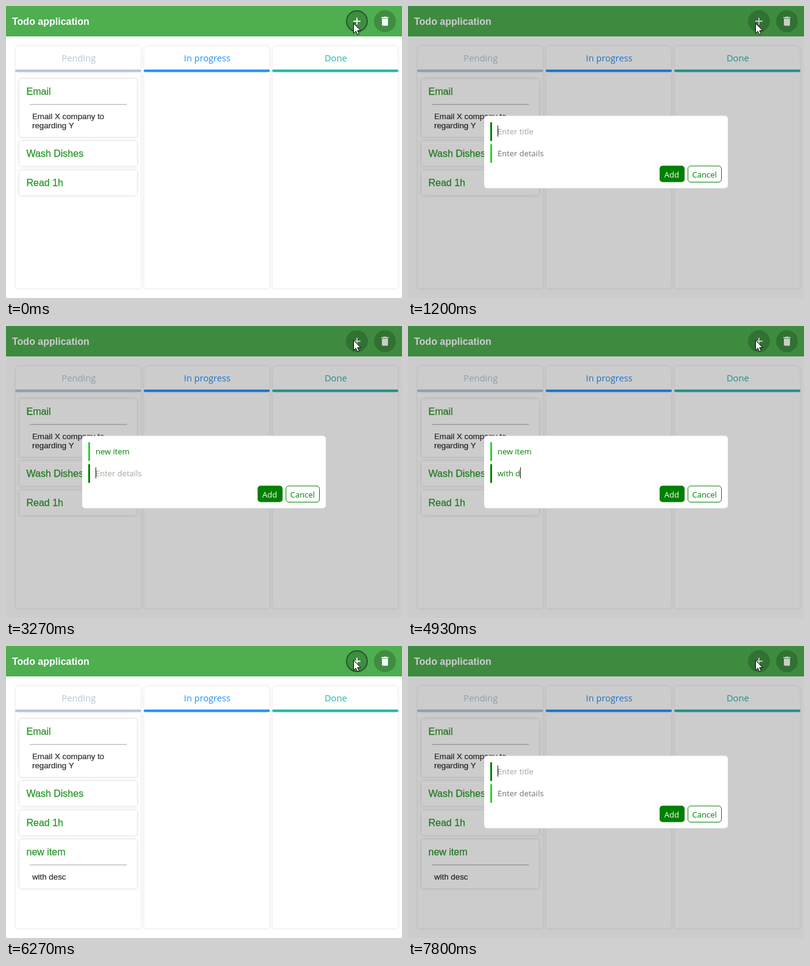
Write an HTML page that moves like this. It is 650 px wide and 480 px high and loops after 8000 ms.

```html
<!DOCTYPE html>
<html lang="en">
<head>
<meta charset="utf-8">
<title>Todo application</title>
<style>
  html, body { margin: 0; width: 650px; height: 480px; overflow: hidden; background: #fff; }
  svg { display: block; }
  text { white-space: pre; }
  .ui { font-family: "Open Sans", "Noto Sans", sans-serif; font-size: 13px; }
  .head { font-size: 14.7px; text-anchor: middle; }
  .arial { font-family: "Liberation Sans", Arial, sans-serif; }
  .app { font-size: 16px; font-weight: bold; fill: #fff; }
  .name { font-size: 16px; fill: #259625; stroke: #259625; stroke-width: .25px; }
  .note { font-size: 13.3px; fill: #2a2a2a; stroke: #2a2a2a; stroke-width: .2px; }
  .col { fill: #fff; filter: drop-shadow(0 0 2px rgba(0, 0, 0, .13)); }
  .card { fill: #fff; filter: drop-shadow(0 0 2px rgba(0, 0, 0, .19)); }
</style>
</head>
<body>
<svg width="650" height="480" viewBox="0 0 650 480">
  <rect width="650" height="50" fill="#4eae50"/>
  <text class="arial app" x="10" y="30.5">Todo application</text>
  <circle id="plus" cx="576" cy="25" r="17" stroke-width="2"/>
  <path d="M570.2 25h11.6M576 19.2v11.6" stroke="#fff" stroke-width="1.8"/>
  <circle cx="622" cy="25" r="18" fill="#3f8d41"/>
  <path transform="translate(612 15) scale(.833)" fill="#fff"
    d="M6 19a2 2 0 0 0 2 2h8a2 2 0 0 0 2-2V7H6zM19 4h-3.5l-1-1h-5l-1 1H5v2h14z"/>
  <g id="board"></g>
  <g id="modal">
    <rect width="650" height="480" fill="#000" opacity=".2"/>
    <rect x="125" y="180.5" width="400" height="119" rx="5" fill="#fff"/>
    <g id="fields" class="ui"></g>
    <rect id="caret" width="1" height="18" fill="#111"/>
    <rect id="add" x="413" y="262.5" width="41" height="27"/>
    <rect id="dots" x="413.5" y="262.5" width="40" height="27" fill="none" stroke="#000" stroke-dasharray="1 1"/>
    <text class="ui" x="420.8" y="281.5" fill="#fff">Add</text>
    <rect x="459.5" y="263" width="55" height="26.5" rx="4.5" fill="#fff" stroke="#008000"/>
    <text class="ui" x="466.6" y="281.5" fill="#008000">Cancel</text>
  </g>
  <path id="mouse" d="M0 0V16.4L3.8 12.9L6.4 18.7L9 17.5L6.5 11.9H11.6Z"
    fill="#fff" stroke="#000" stroke-linejoin="round"/>
</svg>
<script>
const $ = id => document.getElementById(id);

function add(parent, tag, attrs, text) {
  const el = document.createElementNS("http://www.w3.org/2000/svg", tag);
  for (const key in attrs) el.setAttribute(key, attrs[key]);
  if (text) el.textContent = text;
  return parent.appendChild(el);
}

function column(x, title, color) {
  const g = $("board");
  add(g, "rect", { class: "col", x, y: 106, width: 205, height: 358, rx: 1 });
  add(g, "rect", { class: "col", x, y: 66, width: 205, height: 42, rx: 6 });
  add(g, "rect", { x: x - 1, y: 104.5, width: 207, height: 4, rx: 2, fill: color });
  add(g, "text", { class: "ui head", x: x + 103.3, y: 91, fill: color }, title);
}

function card(y, height, title, ...notes) {
  const g = add($("board"), "g", {});
  add(g, "rect", { class: "card", x: 22, y, width: 193, height, rx: 4 });
  add(g, "text", { class: "arial name", x: 33.5, y: y + 26 }, title);
  if (notes.length) add(g, "rect", { x: 39, y: y + 41, width: 159.5, height: 1.6, fill: "#c6c6c6" });
  notes.forEach((line, i) =>
    add(g, "text", { class: "arial note", x: 43, y: y + 66 + 15 * i }, line));
  return g;
}

function field(y, hint, value, keys) {
  const bar = add($("fields"), "rect", { x: 135, y, width: 3, height: 31, rx: 1 });
  const text = add($("fields"), "text", { x: 147, y: y + 20 });
  return { y, hint, value, keys, bar, text };
}

column(16, "Pending", "#b0c4de");
column(227, "In progress", "#1e90ff");
column(438, "Done", "#20b2aa");
card(120, 95, "Email", "Email X company to", "regarding Y");
card(222, 41, "Wash Dishes");
card(270, 41, "Read 1h");
const newCard = card(318, 80.5, "new item", "with desc");

// keys: [time, letters typed so far]
const title = field(191, "Enter title", "new item",
  [[2400, 1], [2530, 2], [2600, 3], [2800, 5], [2870, 6], [2930, 7], [3000, 8]]);
const details = field(227, "Enter details", "with desc",
  [[3800, 1], [3870, 2], [4270, 3], [4400, 4], [4530, 5], [4930, 6], [5000, 7], [5200, 8], [5330, 9]]);

const LOOP = 8000, OPEN = 1200, TO_DETAILS = 3270, TO_ADD = 5730, PRESS = 6130, CLOSE = 6270, REOPEN = 7800;
const show = (el, on) => { el.style.display = on ? "" : "none"; };
const within = (t, from, to) => t >= from && t < to;

function drawField(f, t, focused) {
  const count = f.keys.reduce((n, [at, letters]) => t >= at ? letters : n, 0);
  f.bar.setAttribute("fill", focused ? "#008000" : "#32cd32");
  f.text.textContent = count ? f.value.slice(0, count) : f.hint;
  f.text.setAttribute("fill", count ? "#008000" : focused ? "#a3a3a3" : "#6f6f6f");
  if (focused) {
    $("caret").setAttribute("x", 147 + (count ? Math.round(f.text.getComputedTextLength()) : 0));
    $("caret").setAttribute("y", f.y + 5.5);
  }
}

function draw(t) {
  const open = within(t, OPEN, CLOSE) || t >= REOPEN;
  const pressed = within(t, 1070, OPEN) || within(t, 7670, REOPEN);
  $("plus").setAttribute("fill", pressed ? "#2f6b32" : "#3f8d41");
  $("plus").setAttribute("stroke", open ? "#3f8d41" : pressed ? "#1d4520" : "#24582a");
  show(newCard, t >= CLOSE);
  show($("modal"), open);
  if (open) {
    const m = t >= REOPEN ? t - REOPEN + OPEN : t;
    drawField(title, m, m < TO_DETAILS);
    drawField(details, m, within(m, TO_DETAILS, TO_ADD));
    show($("caret"), m < TO_ADD && !within(m, 1670, 2200));
    show($("dots"), m >= TO_ADD);
    $("add").setAttribute("fill", m >= PRESS ? "#32cd32" : "#008000");
    $("add").setAttribute("rx", m >= TO_ADD ? 2 : 5);
  }
  const y = t < 1270 ? 28.5 : t < 1330 ? 26.5 : 23.5;
  $("mouse").setAttribute("transform", `translate(570.5 ${y})`);
}

const start = performance.now();
function tick() {
  draw((performance.now() - start) % LOOP);
  requestAnimationFrame(tick);
}
tick();
</script>
</body>
</html>
```
